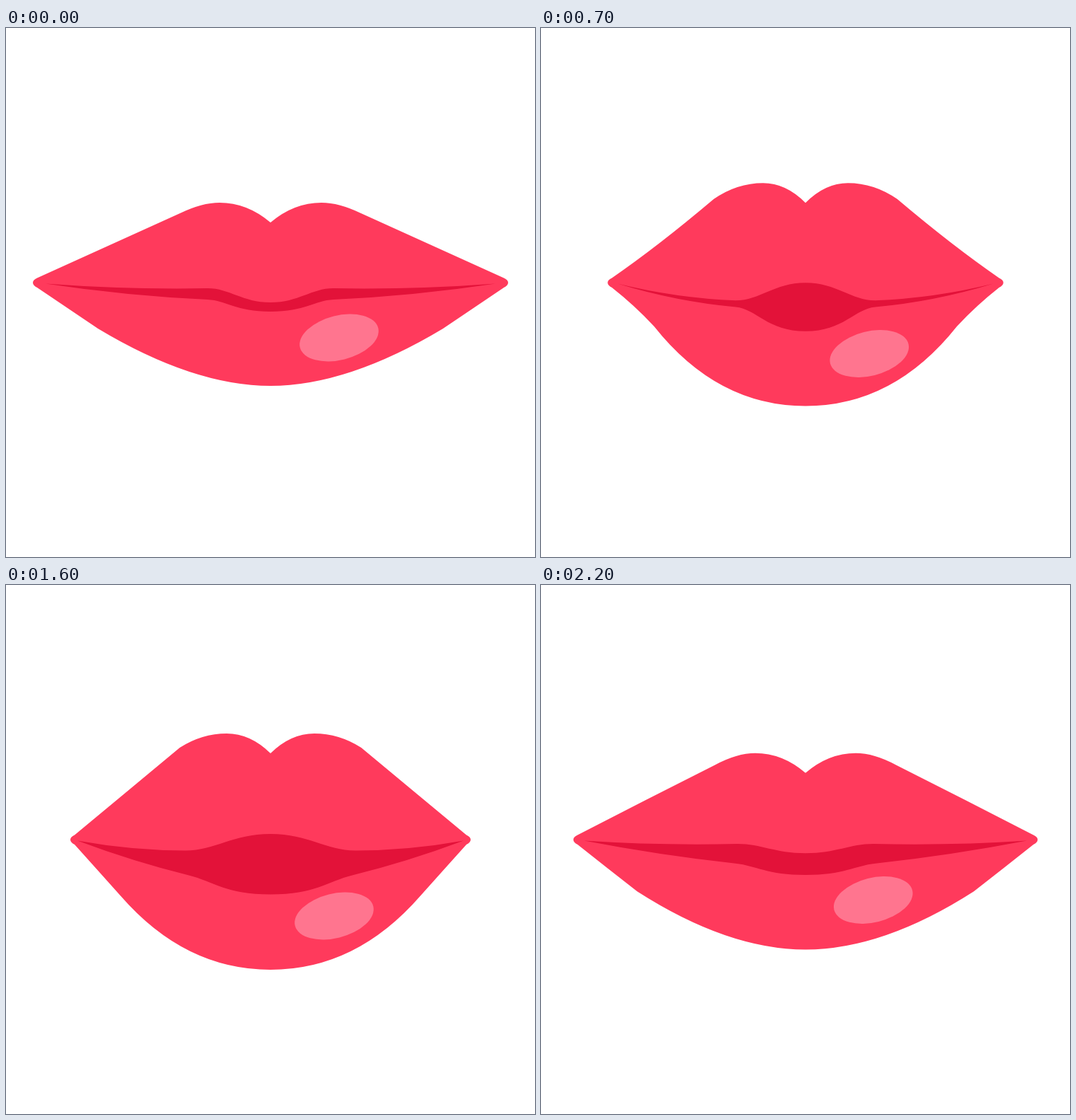
Recreate the animation shown at these times as an HTML page with a canvas. Size 748 by 748 pixels, loop 2.3 s.

```html
<!DOCTYPE html>
<html lang="en">
<head>
<meta charset="utf-8">
<title>Lips</title>
<style>
  html, body { margin: 0; width: 100%; height: 100%; overflow: hidden; background: #fff; }
  canvas { display: block; }
</style>
</head>
<body>
<canvas id="stage" width="748" height="748"></canvas>
<script>
const ctx = document.getElementById('stage').getContext('2d');
const LOOP = 2300, STEP = 100, MID = 374;

const ramp = (n, from, to) => Math.min(1, Math.max(0, (n - from) / (to - from)));

// Fills a half shape and its mirror image; x counts from the middle axis.
function mirrored(color, trace) {
  ctx.fillStyle = color;
  for (const side of [1, -1]) {
    ctx.setTransform(side, 0, 0, 1, MID, 0);
    ctx.beginPath();
    trace();
    ctx.fill();
  }
  ctx.resetTransform();
}

function drawLips(pose, kiss, open) {
  const sharp = kiss ** 4;                 // corners pinch only near the full kiss
  const bend = 36 * sharp - 4 * open;
  const width = pose(336, 261, 305);
  const peakX = pose(72, 56, 68), peakY = pose(247, 210, 210);
  const shoulderX = 128 + 5 * sharp, shoulderY = peakY + 15 + 24 * sharp + 7 * open;
  const cheekX = pose(244, 204, 220), cheekY = pose(425, 421, 458);
  const bottom = pose(506, 544, 544);
  const tipX = width - 6, tipTop = 353.5, tipLow = 367;

  mirrored('#ff3a5c', () => {
    ctx.moveTo(0, peakY + 28);
    ctx.quadraticCurveTo(peakX * 0.46, peakY, peakX, peakY);
    ctx.quadraticCurveTo(97, peakY, shoulderX, shoulderY);
    ctx.quadraticCurveTo((shoulderX + tipX) / 2 + bend * 0.65,
      (shoulderY + tipTop) / 2 + bend, tipX, tipTop);
    ctx.bezierCurveTo(width + 2, 357, width + 2, 363, tipX, tipLow);
    ctx.quadraticCurveTo((tipX + cheekX) / 2 - bend * 0.2,
      (tipLow + cheekY) / 2 - bend * 0.2, cheekX, cheekY);
    ctx.quadraticCurveTo(pose(109, 130, 112), bottom, 0, bottom);
  });
}

function drawMouth(pose, open) {
  const endX = pose(318, 248, 298), endY = 361.5;
  const top = pose(388, 351, 353), low = pose(401, 438, 437);
  const upX = pose(89, 102, 96) + 85 * open ** 2, upY = pose(368, 391, 360);
  const downX = pose(89, 102, 129), downY = pose(384, 398, 423);
  const sagY = (endY + downY) / 2 + pose(6, 10, 0);
  const slope = 2 * (downY - sagY) / (endX - downX);

  mirrored('#e31239', () => {
    ctx.moveTo(0, top);
    ctx.bezierCurveTo(upX * 0.45, top, upX * 0.65, upY, upX, upY);
    ctx.quadraticCurveTo((upX + endX) / 2, 370 + (upY - 368) * 0.7, endX, endY);
    ctx.quadraticCurveTo((downX + endX) / 2, sagY, downX, downY);
    ctx.bezierCurveTo(downX * 0.7, downY + downX * 0.3 * slope, downX * 0.55, low, 0, low);
  });
}

function drawGloss(pose) {
  ctx.fillStyle = '#ff758f';
  ctx.beginPath();
  ctx.ellipse(pose(471, 462, 466), pose(438, 468, 468), 57, 31.4, -14 * Math.PI / 180, 0, 2 * Math.PI);
  ctx.fill();
}

// Closed lips pucker to a kiss, hold, spread wide open, then close.
function draw(n) {
  const spread = ramp(n, 13, 19);
  const kiss = ramp(n, 1, 9) - spread;
  const open = spread - ramp(n, 19, 23);
  const pose = (closed, kissed, wide) =>
    closed + (kissed - closed) * kiss + (wide - closed) * open;

  ctx.clearRect(0, 0, 748, 748);
  drawLips(pose, kiss, open);
  drawMouth(pose, open);
  drawGloss(pose);
}

function tick() {
  draw(Math.floor(performance.now() % LOOP / STEP));
  requestAnimationFrame(tick);
}
tick();
</script>
</body>
</html>
```
